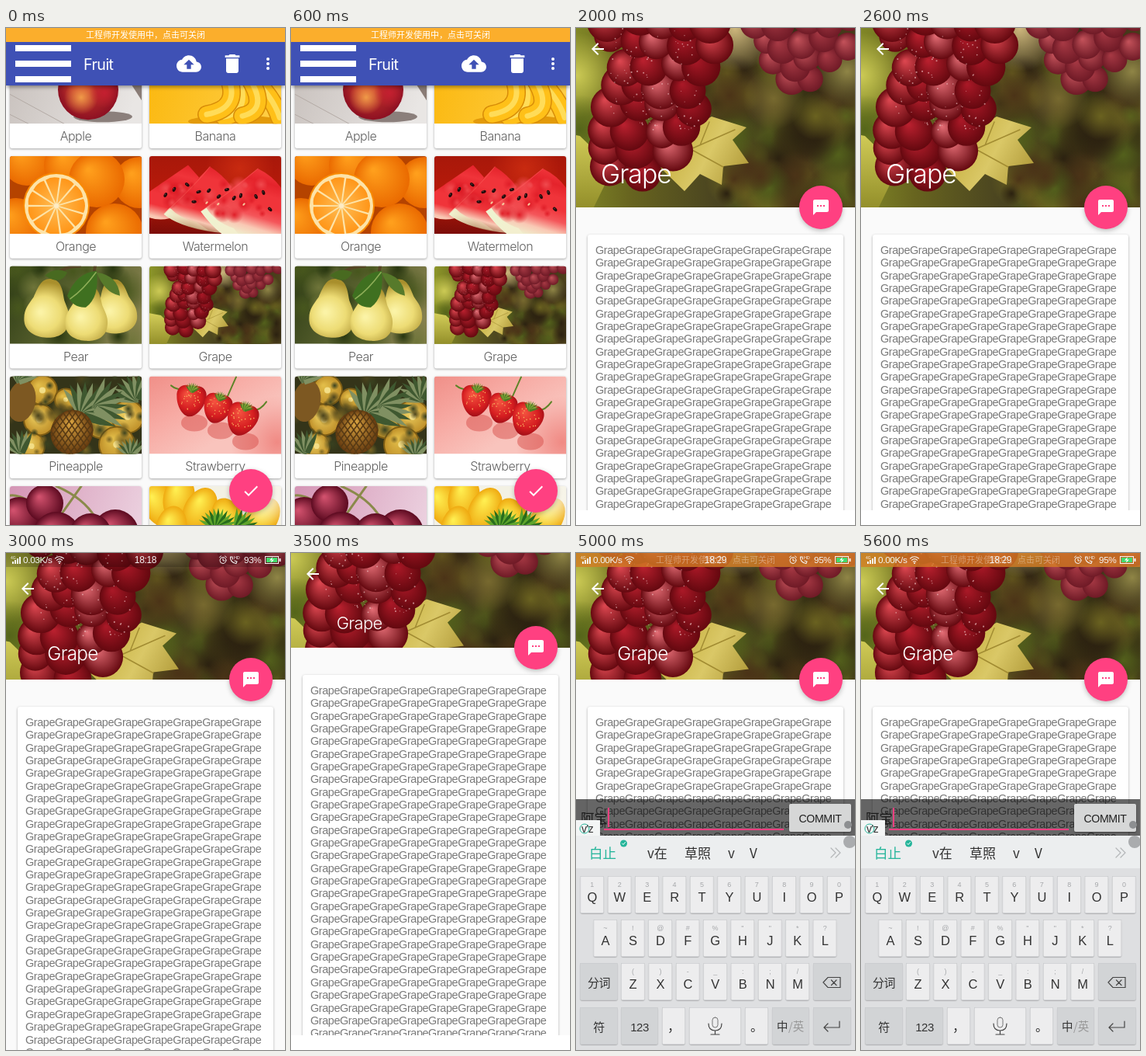
An HTML page with a canvas that plays this animation: 360x640 px, repeating every 6 s.

```html
<!DOCTYPE html>
<html lang="en">
<head>
<meta charset="utf-8">
<title>Fruit</title>
<style>
html, body { margin: 0; width: 100%; height: 100%; overflow: hidden; background: #fff; }
canvas { display: block; width: 360px; height: 640px; }
</style>
</head>
<body>
<canvas id="stage"></canvas>
<script>
const W = 360, H = 640;
const canvas = document.getElementById('stage');
const dpr = window.devicePixelRatio || 1;
canvas.width = W * dpr;
canvas.height = H * dpr;
const ctx = canvas.getContext('2d');
ctx.scale(dpr, dpr);

const SANS = '"Liberation Sans", Arial, sans-serif';
const LIGHT = 'Inter, "Liberation Sans", sans-serif';
const CJK = '"Noto Sans CJK SC", "Noto Sans CJK", sans-serif';
const BLUE = '#3f51b5', PINK = '#ff4081', GREY = '#757575';

const icons = {
  cloud: 'M19.35 10.04C18.67 6.59 15.64 4 12 4 9.11 4 6.6 5.64 5.35 8.04 2.34 8.36 0 10.91 0 14c0 3.31 2.69 6 6 6h13c2.76 0 5-2.24 5-5 0-2.64-2.05-4.78-4.65-4.96zM14 13v4h-4v-4H7l5-5 5 5h-3z',
  trash: 'M6 19c0 1.1.9 2 2 2h8c1.1 0 2-.9 2-2V7H6v12zM19 4h-3.5l-1-1h-5l-1 1H5v2h14V4z',
  done: 'M9 16.17L4.83 12l-1.42 1.41L9 19 21 7l-1.41-1.41z',
  back: 'M20 11H7.83l5.59-5.59L12 4l-8 8 8 8 1.41-1.41L7.83 13H20v-2z',
  chat: 'M20 2H4c-1.1 0-1.99.9-1.99 2L2 22l4-4h14c1.1 0 2-.9 2-2V4c0-1.1-.9-2-2-2zM9 11H7V9h2v2zm4 0h-2V9h2v2zm4 0h-2V9h2v2z',
  call: 'M6.62 10.79c1.44 2.83 3.76 5.14 6.59 6.59l2.2-2.2c.27-.27.67-.36 1.02-.24 1.12.37 2.33.57 3.57.57.55 0 1 .45 1 1V20c0 .55-.45 1-1 1-9.39 0-17-7.61-17-17 0-.55.45-1 1-1h3.5c.55 0 1 .45 1 1 0 1.25.2 2.45.57 3.57.11.35.03.74-.25 1.02l-2.2 2.2z',
  friends: 'M16 11a3 3 0 1 0 0-6 3 3 0 0 0 0 6zm-8 0a3 3 0 1 0 0-6 3 3 0 0 0 0 6zm0 2c-2.33 0-7 1.17-7 3.5V19h14v-2.5c0-2.33-4.67-3.5-7-3.5zm8 0c-.29 0-.62.02-.97.05 1.16.84 1.97 1.97 1.97 3.45V19h6v-2.5c0-2.33-4.67-3.5-7-3.5z',
  place: 'M12 2C8.13 2 5 5.13 5 9c0 5.25 7 13 7 13s7-7.75 7-13c0-3.87-3.13-7-7-7zm0 9.5a2.5 2.5 0 0 1 0-5 2.5 2.5 0 0 1 0 5z',
  mail: 'M21.99 8c0-.72-.37-1.35-.94-1.7L12 1 2.95 6.3C2.38 6.65 2 7.28 2 8v10c0 1.1.9 2 2 2h16c1.1 0 2-.9 2-2l-.01-10zM12 13L3.74 7.84 12 3l8.26 4.84L12 13z',
  tasks: 'M19 2h-4.18C14.4.84 13.3 0 12 0c-1.3 0-2.4.84-2.82 2H5c-1.1 0-2 .9-2 2v16c0 1.1.9 2 2 2h14c1.1 0 2-.9 2-2V4c0-1.1-.9-2-2-2zm-7 0a1 1 0 0 1 0 2 1 1 0 0 1 0-2zm7 18H5V4h2v3h10V4h2v16z'
};

// --- drawing helpers ---
function box(x, y, w, h, color, r = 0) {
  ctx.fillStyle = color;
  ctx.beginPath();
  if (r) ctx.roundRect(x, y, w, h, r); else ctx.rect(x, y, w, h);
  ctx.fill();
}
function oval(x, y, rx, ry, color, turn = 0) {
  ctx.fillStyle = color;
  ctx.beginPath();
  ctx.ellipse(x, y, rx, ry, turn, 0, 7);
  ctx.fill();
}
const disc = (x, y, r, color) => oval(x, y, r, r, color);
function shape(d, color) {
  ctx.fillStyle = color;
  ctx.fill(new Path2D(d), 'evenodd');
}
function line(d, color, width = 1) {
  ctx.strokeStyle = color;
  ctx.lineWidth = width;
  ctx.lineCap = 'round';
  ctx.stroke(new Path2D(d));
}
function within(draw) {
  ctx.save();
  draw();
  ctx.restore();
}
function icon(name, x, y, color = '#fff', size = 24) {
  within(() => {
    ctx.translate(x - size / 2, y - size / 2);
    ctx.scale(size / 24, size / 24);
    shape(icons[name], color);
  });
}
function shadow(blur, dy, alpha, draw) {
  within(() => {
    ctx.shadowColor = `rgba(0,0,0,${alpha})`;
    ctx.shadowBlur = blur * dpr;
    ctx.shadowOffsetY = dy * dpr;
    draw();
  });
}
// Colours are spread evenly along the line.
function fade(x0, y0, x1, y1, ...colors) {
  const g = ctx.createLinearGradient(x0, y0, x1, y1);
  colors.forEach((c, i) => g.addColorStop(i / (colors.length - 1), c));
  return g;
}
function ball(x, y, r, light, dark, ry = r, turn = 0) {
  within(() => {
    ctx.translate(x, y);
    ctx.rotate(turn);
    ctx.scale(1, ry / r);
    const g = ctx.createRadialGradient(-r * .3, -r * .35, r * .05, 0, 0, r);
    g.addColorStop(0, light);
    g.addColorStop(1, dark);
    disc(0, 0, r, g);
  });
}
function glow(x, y, r, color) {
  const g = ctx.createRadialGradient(x, y, 0, x, y, r);
  g.addColorStop(0, color);
  g.addColorStop(1, color + '00');
  disc(x, y, r, g);
}
function random(seed) {
  return () => (seed = (seed * 16807) % 2147483647) / 2147483647;
}
// Soft spots scattered over an area.
function mottle(x, y, w, h, n, r, colors, seed) {
  const rnd = random(seed);
  for (let i = 0; i < n; i++) glow(x + rnd() * w, y + rnd() * h, r * (.5 + rnd()), colors[i % colors.length]);
}
function text(s, x, y, size, color, align = 'left', family = SANS, weight = 400) {
  ctx.font = `${weight} ${size}px ${family}`;
  ctx.letterSpacing = family === CJK ? '0px' : `${-.029 * size}px`;
  ctx.textAlign = align;
  ctx.fillStyle = color;
  ctx.fillText(s, x, y);
}

// --- fruit pictures, 170 x 100 ---
function apple() {
  box(0, 0, 170, 100, fade(0, 40, 150, 100, '#c9c2be', '#e9e6e4'));
  shape('M125 0H170V70z', '#8a7c76');
  line('M0 62L70 100M0 88L24 100', '#b3aaa5', 1);
  oval(120, 91, 38, 7, '#8b7f7b');
  ball(101, 56, 39, '#e2482f', '#8c1022');
  glow(92, 66, 22, '#f09a48');
  glow(122, 60, 20, '#c41f30');
}
function banana() {
  box(0, 0, 170, 100, fade(0, 50, 170, 100, '#fbb912', '#ffd04a'));
  oval(110, 97, 60, 8, '#e39a0a');
  ['M132 40Q160 66 168 92', 'M115 40Q132 85 96 91', 'M100 36Q120 80 74 88', 'M128 40Q155 82 120 90'].forEach(d => {
    line(d, '#d88d08', 24);
    line(d, '#ffc018', 21);
    line(d, '#ffdc58', 7);
  });
}
function orange() {
  box(0, 0, 170, 100, '#b54300');
  const skin = [[22, 6, 32], [78, 12, 34], [167, 34, 33], [112, 30, 36], [8, 88, 34], [135, 98, 37]];
  skin.forEach(([x, y, r]) => ball(x, y, r, '#ff9f1c', '#ea6a00'));
  disc(60, 64, 43, '#f98a00');
  disc(60, 64, 41, '#fde3a8');
  for (let i = 0; i < 11; i++) {
    within(() => {
      ctx.translate(60, 64);
      ctx.rotate(i * Math.PI * 2 / 11);
      shape('M3 0L35 -9Q39 0 35 9z', fade(0, 0, 38, 0, '#ffbe55', '#ff9416'));
    });
  }
  disc(60, 64, 3, '#fdebc4');
}
function pearFruit(x, y, size, turn) {
  within(() => {
    ctx.translate(x, y);
    ctx.rotate(turn);
    ctx.scale(size, size);
    const g = ctx.createRadialGradient(-9, -3, 2, 0, 0, 42);
    g.addColorStop(0, '#fbf3a6');
    g.addColorStop(.5, '#eddc75');
    g.addColorStop(1, '#a98f2c');
    shape('M0 -47C13 -47 16 -34 20 -21C26 -10 30 -4 29 7C28 23 14 29 0 29S-28 23 -29 7C-30 -4 -26 -10 -20 -21C-16 -34 -13 -47 0 -47z', g);
  });
}
function pear() {
  box(0, 0, 170, 100, fade(0, 0, 170, 90, '#2d3b14', '#5d6531', '#8c8452'));
  mottle(0, 0, 170, 100, 22, 22, ['#47561d', '#6f753a', '#27350f'], 8);
  line('M55 20Q62 0 90 0M105 30L110 0', '#554424', 4);
  pearFruit(137, 60, .92, -.1);
  pearFruit(48, 63, 1, .12);
  pearFruit(99, 69, .94, .08);
  shape('M74 38Q86 8 112 6Q116 40 98 53Q82 54 74 38z', '#3f7020');
  line('M78 42Q95 30 111 8', '#8fae58', 1.5);
  shape('M112 8Q140 12 142 38Q122 34 112 8z', '#577a2b');
  shape('M45 12Q60 0 74 8Q66 26 45 12z', '#486a20');
}
function crown(x, y, turn, n = 11, size = 38, colors = ['#809062', '#3f5830']) {
  within(() => {
    ctx.translate(x, y);
    ctx.rotate(turn);
    for (let i = 0; i < n; i++) {
      within(() => {
        ctx.rotate((i - (n - 1) / 2) * .23);
        shape(`M${-size / 9} 0Q${-size / 8} ${-size / 2} 1 ${-size}Q${size / 6} ${-size / 2} ${size / 9} 0z`, colors[i % 2]);
      });
    }
  });
}
function pineapple() {
  box(0, 0, 170, 100, '#343419');
  const cuts = [[42, 18, 20], [38, 56, 21], [118, 60, 21], [152, 52, 22], [138, 88, 24], [28, 90, 18], [72, 30, 15]];
  cuts.forEach(([x, y, r], i) => {
    disc(x, y, r, '#7d5c14');
    ball(x, y, r - 2, i % 2 ? '#efd263' : '#e2bd49', '#c0912a');
    disc(x, y, r / 5, '#f3de86');
  });
  mottle(0, 0, 170, 100, 60, 8, ['#4b431c', '#7b6523', '#38401f'], 27);
  oval(15, 32, 18, 27, '#7d5822', .2);
  crown(12, 8, .3, 9, 27);
  crown(16, 99, -.4, 8, 30);
  crown(166, 30, -.6, 10, 35);
  crown(158, 103, -.2, 9, 24);
  crown(95, 51, .6, 12, 44);
  crown(110, 42, 1.2, 9, 42);
  ball(80, 72, 27, '#d7a13f', '#64390f', 29, .5);
  within(() => {
    ctx.beginPath();
    ctx.ellipse(80, 72, 27, 29, .5, 0, 7);
    ctx.clip();
    for (let i = -60; i < 80; i += 8) line(`M${60 + i} 40L${105 + i} 106M${110 + i} 40L${60 + i} 106`, '#583a14', 1.6);
  });
}
function strawberry() {
  box(0, 0, 170, 100, fade(0, 0, 60, 100, '#f08f88', '#f7aaa3', '#f9c4bd'));
  glow(165, 85, 60, '#f08a84');
  line('M50 15Q38 20 28 12M100 28Q107 12 112 1M130 44Q142 46 151 33', '#5e8428', 2);
  const rnd = random(33);
  [[54, 30, 1.05, .1], [88, 40, 1, .25], [120, 54, 1.1, .3]].forEach(([x, y, size, turn]) => {
    oval(x + 4, y + 30, 17, 11, '#d4484477');
    within(() => {
      ctx.translate(x, y);
      ctx.rotate(turn);
      ctx.scale(size, size);
      const g = ctx.createRadialGradient(-6, -6, 1, 0, 0, 24);
      g.addColorStop(0, '#f4523f');
      g.addColorStop(.6, '#d51d20');
      g.addColorStop(1, '#8f0a14');
      shape('M0 -16C12 -20 20 -13 18 -2C16 10 8 20 0 21S-17 10 -18 -2C-20 -13 -12 -20 0 -16z', g);
      for (let k = 0; k < 26; k++) {
        const a = rnd() * 6.3, d = Math.sqrt(rnd()) * 14;
        disc(Math.cos(a) * d, Math.sin(a) * d, .7, '#f9b15f');
      }
      crown(0, -9, 0, 9, 12, ['#4d7d22', '#86a63c']);
    });
  });
}
function cherry() {
  box(0, 0, 170, 100, fade(0, 0, 170, 60, '#d495b5', '#ecd2e0'));
  line('M60 45Q85 10 92 0M110 40Q95 15 60 0M28 20Q8 10 0 12', '#8a8a4a', 3);
  [[12, 40, 26], [45, 22, 24], [136, 60, 30], [60, 64, 31], [104, 62, 27]].forEach(([x, y, r]) => ball(x, y, r, '#d0506c', '#5c0a20'));
}
function mango() {
  box(0, 0, 170, 100, '#f3f1e4');
  [[12, 22, -.3], [38, 15, .2], [145, 42, .6], [65, 30, .5], [102, 44, -.4], [28, 55, .2]].forEach(([x, y, turn]) =>
    ball(x, y, 20, '#ffee50', '#efa910', 30, turn));
  glow(150, 12, 40, '#faf7ec');
  const leaf = ['#5fa52c', '#276d1c'];
  crown(88, 55, 0, 11, 27, leaf);
  crown(112, 58, .8, 8, 30, leaf);
}

// --- the two large pictures, 360 x 250 ---
function bunch(rows, r, light, dark, seed) {
  const rnd = random(seed);
  rows.forEach(([y, from, to, n]) => {
    for (let i = 0; i < n; i++) {
      const x = from + (to - from) * i / (n - 1 || 1) + rnd() * 14 - 7;
      ball(x, y + rnd() * 16 - 8, r * (.85 + rnd() * .3), light[i % light.length], dark);
    }
  });
}
function grape() {
  box(-40, 0, 440, 260, fade(-40, 0, 400, 0, '#8f9a2a', '#67641f', '#4a4420', '#3c2d17', '#4f431c'));
  mottle(160, 60, 220, 190, 90, 30, ['#3a3514', '#6a6220', '#2b2110', '#53601c', '#4b3317'], 12);
  glow(205, 20, 55, '#cdb67c');
  glow(0, 80, 55, '#ccca55');
  glow(5, 150, 45, '#55651a');
  glow(350, 75, 45, '#8f8546');
  glow(255, 110, 40, '#77692f');
  bunch([[82, 285, 305, 2], [62, 258, 325, 4], [38, 240, 350, 5], [10, 235, 385, 6]], 19, ['#c05058', '#a53843'], '#6f1a26', 5);
  shape('M-40 150L5 158L30 182L40 215L18 260H-40z', fade(0, 150, 0, 250, '#d5cf5a', '#938f2a'));
  shape('M128 160L175 133L220 147L202 163L223 193L190 197L188 221L160 207L140 229L110 200z', fade(130, 150, 220, 200, '#c7b040', '#dac867', '#b39d3c'));
  line('M125 185L205 150M148 175L190 198M160 170L172 140', '#a28c32', 1.5);
  const reds = ['#d9454e', '#b8202e', '#e06a72', '#a81826'];
  bunch([[200, 50, 85, 2], [178, 40, 118, 3], [148, 38, 142, 4], [120, 46, 146, 4], [92, 52, 146, 4], [64, 58, 165, 4], [36, 42, 172, 5], [8, 46, 172, 5]], 24, reds, '#64080f', 71);
  const rnd = random(19);
  for (let i = 0; i < 110; i++) disc(45 + rnd() * 115, 5 + rnd() * 145, .5 + rnd() * .6, '#f8d4d499');
}
function melonSeed(x, y, turn) {
  oval(x, y, 5, 8, '#240b0b', turn);
  oval(x - 1.5, y - 2, 1, 2.5, '#77605c', turn);
}
function watermelon() {
  box(-40, 0, 440, 260, fade(0, 0, 0, 250, '#a8180a', '#b81a0a', '#7c0d08'));
  glow(260, 40, 110, '#c82a10');
  const red = '#e4232b', warm = '#f0343a', pale = '#f9c8b4', rind = '#eef3d0';
  shape('M93 29L128 68L60 190Q10 215 -40 195V120z', fade(93, 30, 45, 210, red, warm, red, warm, warm, pale));
  shape('M163 34Q205 60 232 98L210 248Q80 238 14 187z', fade(163, 34, 105, 242, red, warm, warm, red, warm, pale, '#8a5a30'));
  shape('M14 187L34 166Q66 200 120 212L160 240Q60 225 14 187z', fade(24, 176, 100, 220, rind, '#e9e3b866'));
  shape('M318 40Q380 70 410 130V260H215Q170 228 134 178z', fade(320, 40, 255, 255, warm, red, warm, warm, '#f4565a', pale, rind));
  shape('M134 178L152 166Q180 212 240 232L262 260H215Q170 228 134 178z', fade(170, 190, 215, 215, rind, '#f3efcf'));
  mottle(150, 90, 200, 100, 26, 20, ['#f04a4e', '#e01e28'], 4);
  mottle(20, 90, 110, 70, 16, 18, ['#f04a4e', '#da1a24'], 9);
  line('M163 34Q120 90 14 187M318 40Q240 110 134 178', '#ff7a6e', 1);
  [[90, 92, -.9], [48, 107, .4], [20, 125, .5], [112, 147, 1.5], [127, 115, 1.2], [160, 111, .7], [192, 130, .8], [218, 108, 1.2],
    [263, 127, .2], [241, 135, .6], [312, 130, -.4], [336, 117, -.3], [357, 171, -.8]].forEach(s => melonSeed(...s));
  [[153, 150], [273, 155], [190, 154]].forEach(([x, y]) => oval(x, y, 3, 5, '#f6c79b', .8));
}
const small = pic => () => {
  ctx.scale(.4, .4);
  ctx.translate(32, 0);
  pic();
};

// --- interface parts ---
function notice(alpha) {
  text('工程师开发使用中，点击可关闭', 180, 13, 11, `rgba(255,255,255,${alpha})`, 'center', CJK);
}
function status(speed, time, power, full) {
  const c = '#f4f4f4', shift = full ? -6 : 0;
  text('4G', 6, 8, 5, c);
  for (let i = 0; i < 4; i++) box(8 + i * 3, 11 - i * 2, 2, 3 + i * 2, c);
  text(speed, 22, 13, 11.8, c);
  line('M63.5 7Q69 2.5 74.5 7M65.5 9.2Q69 6 72.5 9.2M67.3 11.2Q69 9.8 70.7 11.2', c, 1.1);
  disc(69, 13, 1, c);
  text(time, 180, 13, 12, c, 'center');
  within(() => {
    ctx.translate(shift, 0);
    line('M284 9.5A4 4 0 1 1 276 9.5A4 4 0 1 1 284 9.5M280 7V10H282M275.5 5.5L277.5 4M284.5 5.5L282.5 4', c, 1);
    line('M289.5 5Q289 12 297 13.5L298 11L295 10M289.5 5L292 5L292.5 8', c, 1.1);
    text('HD', 294, 8, 5.5, c);
  });
  text(power + '%', 329.5, 13, 11.8, c, 'right');
  ctx.strokeStyle = c;
  ctx.lineWidth = 1;
  ctx.strokeRect(334.5, 4.5, 17, 9);
  box(336, 6, 14, 6, full ? '#fff' : '#43d96b');
  box(352.5, 7, 2, 4, c);
  if (!full) shape('M344 5L340 9.5H343L341.5 13L346 8.5H343z', '#fff');
}
function fab(y, name) {
  shadow(6, 2, .25, () => disc(316, y, 28, PINK));
  icon(name, 316, y);
}
const menu = [['Apple', apple], ['Banana', banana], ['Orange', orange], ['Watermelon', small(watermelon)],
  ['Pear', pear], ['Grape', small(grape)], ['Pineapple', pineapple], ['Strawberry', strawberry],
  ['Cherry', cherry], ['Mango', mango]];

function home() {
  box(0, 0, W, H, '#fafafa');
  menu.forEach(([name, pic], i) => {
    const x = 5 + i % 2 * 180, y = 23.3 + Math.floor(i / 2) * 141.7;
    shadow(3, 1, .35, () => box(x, y, 170, 131.7, '#fff', 3));
    within(() => {
      ctx.beginPath();
      ctx.roundRect(x, y, 170, 100, [3, 3, 0, 0]);
      ctx.clip();
      ctx.translate(x, y);
      pic();
    });
    text(name, x + 85, y + 122, 16, '#606060', 'center', LIGHT, 300);
  });
  fab(596, 'done');
  shadow(5, 2, .4, () => box(0, 18, W, 56, BLUE));
  box(0, 0, W, 18, '#fbae2c');
  notice(1);
  for (let y = 22; y < 70; y += 20) box(12, y, 72, 8, '#fff');
  text('Fruit', 100, 54, 19.7, '#fff', 'left', LIGHT, 400);
  icon('cloud', 236, 46, '#fff', 32);
  icon('trash', 292, 46, '#fff', 32);
  for (let y = 40; y < 53; y += 6) disc(338, y, 2, '#fff');
}

function puppy() {
  within(() => {
    ctx.beginPath();
    ctx.arc(148, 108, 35, 0, 7);
    ctx.clip();
    box(110, 70, 76, 76, fade(0, 73, 0, 143, '#3f5a22', '#7da436'));
    glow(175, 90, 25, '#9aa55a');
    box(110, 114, 76, 8, '#6f9230');
    oval(156, 108, 17, 12, '#e7cda0', -.2);
    line('M146 115L142 129M154 118L157 131M167 112L174 121', '#eedbb8', 6);
    disc(147, 93, 10, '#f3e2c0');
    oval(139, 95, 4, 8, '#d2ab74', .3);
    oval(156, 94, 4, 8, '#d2ab74', -.3);
    disc(146, 98, 2.2, '#403028');
    disc(143, 91, 1.1, '#403028');
    disc(150, 91, 1.1, '#403028');
  });
}
function drawer() {
  home();
  box(0, 18, W, H, 'rgba(0,0,0,.45)');
  box(296, 18, 12, H, fade(296, 0, 308, 0, 'rgba(0,0,0,.4)', 'rgba(0,0,0,0)'));
  box(0, 0, 296, H, '#fafafa');
  box(0, 18, 296, 180, BLUE);
  box(0, 0, W, 18, '#35459b');
  status('0.07K/s', '18:18', 93);
  puppy();
  text('Ning Shuo', 10, 165.5, 14.5, '#fff');
  text('Ning Shuo@example.com', 10, 184.5, 14.5, '#fff');
  box(0, 206, 296, 48, '#dedede');
  [['Call', 'call'], ['Friends', 'friends'], ['Location', 'place'], ['Mail', 'mail'], ['Tasks', 'tasks']].forEach(([name, glyph], i) => {
    const y = 230 + i * 48;
    icon(glyph, 28, y, i ? GREY : BLUE);
    text(name, 72, y + 5.5, 14.5, i ? '#222' : BLUE);
  });
}

// Characters per wrapped line; the pattern repeats.
const wraps = { Grape: [40], Watermelon: [41, 42, 42, 41, 41, 42, 41] };
function detail(word, pic, scroll, hud) {
  const edge = 250 - scroll;
  box(0, 0, W, H + 20, '#fafafa');
  shadow(3, 1, .35, () => box(15, edge + 35, 330, 700, '#fff', 3));
  const wall = word.repeat(300), counts = wraps[word];
  for (let i = 0, at = 0, y = edge + 60; y < H + 30; i++, y += 16.34) {
    const n = counts[i % counts.length];
    text(wall.slice(at, at + n), 25, y, 14.45, '#7a7a7a');
    at += n;
  }
  within(() => {
    ctx.beginPath();
    ctx.rect(0, 0, W, edge);
    ctx.clip();
    ctx.translate(0, -scroll / 2);
    pic();
  });
  if (hud) {
    box(0, 0, W, 18, 'rgba(0,0,0,.2)');
    hud();
  }
  icon('back', 28, 46);
  text(word, 32 + scroll * .245, 218.5 - scroll * .93, 33.8 - scroll * .109, '#fff', 'left', LIGHT, 300);
  fab(edge, 'chat');
}
function cropped(scroll) {
  within(() => {
    ctx.translate(0, -19);
    detail('Grape', grape, scroll);
  });
  box(0, 621, W, 19, '#fff');
}
function commentBar(y, from) {
  box(0, y, W, 48, 'rgba(0,0,0,.6)');
  box(from, y + 38, 268 - from, 2, PINK);
  shadow(2, 1, .4, () => box(275, y + 6, 80, 36, '#d6d7d7', 2));
  text('COMMIT', 315, y + 30, 14.2, '#222', 'center');
}
function melonPage() {
  detail('Watermelon', watermelon, 0, () => status('0.00K/s', '23:09', 100, true));
  commentBar(592, 6);
  text('Your comment after a line', 6, 623, 17.5, '#262626', 'left', LIGHT, 300);
  box(5, 603, 2, 28, PINK);
}

function key(x, y, w, label, hint, dark) {
  shadow(1, 1, .2, () => box(x, y, w, 48, dark ? '#d2d4d6' : '#ededee', 3));
  ctx.strokeStyle = '#c9cbcd';
  ctx.lineWidth = .7;
  ctx.strokeRect(x + .5, y + .5, w - 1, 47);
  const cx = x + w / 2;
  if (hint) text(hint, cx, y + 14, 9, '#a5a7aa', 'center');
  if (label) text(label, cx, y + (hint ? 33 : 31), dark ? 15 : 16.5, '#333', 'center', `"Liberation Sans", ${CJK}`);
}
function keyboard() {
  box(0, 364, W, 42, '#eceeef');
  box(0, 406, W, 234, '#dedfe1');
  [['v在', 92], ['草照', 140], ['v', 196], ['V', 224]].forEach(([s, x]) => text(s, x, 393, 17, '#333', 'left', CJK));
  text('白止', 17, 393, 17.5, '#25b59a', 'left', CJK);
  disc(61.5, 374, 4.5, '#25b59a');
  line('M59.5 374L61 375.5L63.5 372.5', '#fff', 1);
  line('M329 380L335 386L329 392M335 380L341 386L335 392', '#b4b6b8', 1.2);
  disc(353, 372, 8, '#aaacae');
  [['QWERTYUIOP', '1234567890', 5.3, 416], ['ASDFGHJKL', '~!@#%""*?', 22.4, 472], ['ZXCVBNM', '()-_:;/', 58, 528]].forEach(([letters, hints, x, y]) =>
    [...letters].forEach((c, i) => key(x + i * 35.4, y, 30.8, c, hints[i])));
  key(5, 528, 49, '分词', '', true);
  key(306, 528, 49, '', '', true);
  line('M319 553L325 546.5H341V559.5H325zM329.5 550L336 556.5M336 550L329.5 556.5', '#444', 1.2);
  key(5, 585, 49, '符', '', true);
  key(58, 585, 48, '123', '', true);
  key(111, 585, 30, '，');
  key(146, 585, 67, '');
  ctx.strokeStyle = '#444';
  ctx.beginPath();
  ctx.roundRect(176, 598, 7, 13, 3.5);
  ctx.stroke();
  line('M171 606Q171 615 179.5 615Q188 615 188 606M179.5 615V620M174 620H185', '#444', 1.2);
  key(218, 585, 30, '。');
  key(253, 585, 48, '', '', true);
  text('中', 259, 615, 14.5, '#333', 'left', CJK);
  text('/英', 274, 615, 14.5, '#999', 'left', CJK);
  key(306, 585, 49, '', '', true);
  line('M340 603V611H320M325 606L320 611L325 616', '#444', 1.2);
}
function typingPage() {
  detail('Grape', grape, 87, () => {
    box(0, 0, W, 18, 'rgba(226,133,38,.75)');
    notice(.35);
    status('0.00K/s', '18:29', 95);
  });
  commentBar(317, 36);
  text('阿宝', 6, 348, 17.5, '#1c1c1c', 'left', CJK);
  box(41, 328, 2, 25, PINK);
  disc(351, 350, 5, '#8d8f91');
  keyboard();
  box(0, 344, 31, 20, '#f3f5f5');
  ctx.strokeStyle = '#25b59a';
  ctx.lineWidth = 1;
  ctx.beginPath();
  ctx.arc(11, 355, 6, 0, 7);
  ctx.stroke();
  text("v'z", 7, 360, 14, '#333');
}

// --- timeline: [end in ms, scene] ---
const scenes = [
  [1000, home],
  [2000, drawer],
  [3000, () => cropped(0)],
  [3500, () => detail('Grape', grape, 87, () => status('0.03K/s', '18:18', 93))],
  [4000, () => cropped(109)],
  [5000, melonPage],
  [6000, typingPage]
];
let shown = -1;
function tick() {
  const t = performance.now() % 6000;
  const now = scenes.findIndex(([end]) => t < end);
  if (now !== shown) {
    shown = now;
    within(scenes[now][1]);
  }
  requestAnimationFrame(tick);
}
tick();
</script>
</body>
</html>
```
